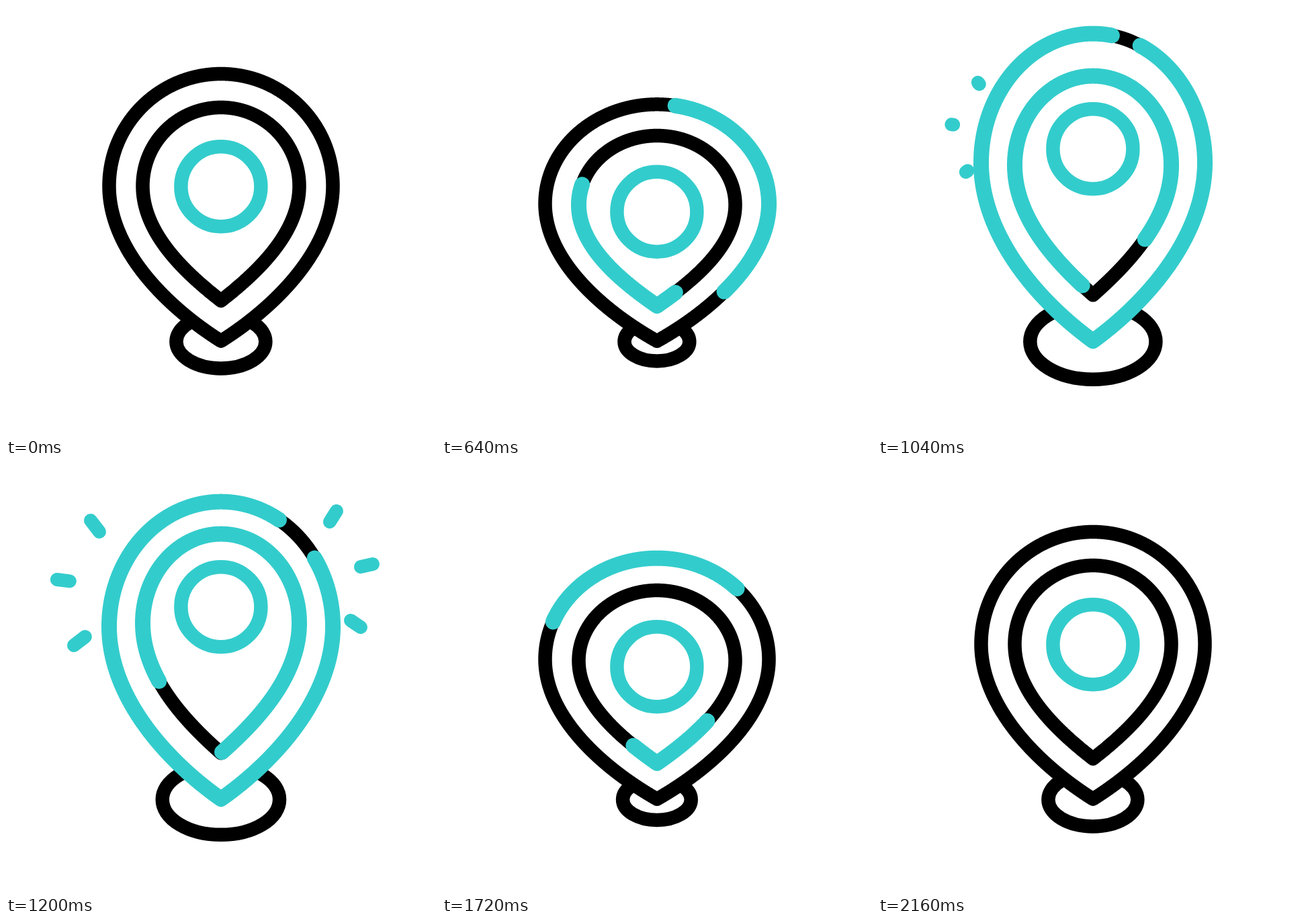
An HTML page with a canvas that plays this animation: 640 by 640 pixels, repeating every 2.64 s.

```html
<!DOCTYPE html>
<html>
<head>
<meta charset="utf-8">
<title>Map pin</title>
<style>
  html, body { margin: 0; width: 100%; height: 100%; overflow: hidden; background: #fff; }
  canvas { display: block; width: 100vmin; height: 100vmin; }
</style>
</head>
<body>
<canvas width="640" height="640"></canvas>
<script>
const ctx = document.querySelector('canvas').getContext('2d');
const LOOP = 2640, STEP = 40, SAMPLES = 2000;
const BLACK = '#000', TEAL = '#33cccc', LINE = 20.5, TRIM_LINE = 23;

// Eased progress from 0 to 1 between two times
function ease(t, from, to) {
  const u = Math.min(1, Math.max(0, (t - from) / (to - from)));
  return u * u * (3 - 2 * u);
}

// Rest, squash, stretch, squash, rest
function bounce(t, times, squash, stretch) {
  const values = [0, squash, -stretch, squash, 0];
  return values.slice(1).reduce(
    (sum, v, i) => sum + (v - values[i]) * ease(t, times[i], times[i + 1]), 0);
}

function samplePath(d) {
  const path = document.createElementNS('http://www.w3.org/2000/svg', 'path');
  path.setAttribute('d', d);
  const length = path.getTotalLength();
  return Array.from({ length: SAMPLES }, (_, i) => path.getPointAtLength(i / SAMPLES * length));
}

const outer = {
  points: samplePath('M320 101A166.5 167 0 0 1 486.5 268C486.5 360 405 445 320 498.7' +
    'C235 445 153.5 360 153.5 268A166.5 167 0 0 1 320 101Z'),
  top: 101, anchor: 499
};
const inner = {
  points: samplePath('M320 438.7C264 395 203.5 337 203.5 268A116.5 117 0 0 1 436.5 268' +
    'C436.5 337 376 395 320 438.7Z'),
  top: 151, anchor: 502
};

// Each ray: near x, near y, far x, far y, delay
const rays = [
  [150.8, 116.4, 124, 81.4, 0],
  [112.2, 176.7, 73, 171.6, 0],
  [133.4, 245.2, 98.4, 272, 0],
  [477.5, 93, 497, 62, 40],
  [520, 154.8, 555, 147, 40],
  [506.4, 228.5, 535.5, 248, 40]
];

function stroke(color, width) {
  ctx.strokeStyle = color;
  ctx.lineWidth = width;
  ctx.stroke();
}

function tracePin(pin, shift, from, to) {
  const scale = 1 - shift / (pin.anchor - pin.top);
  const first = Math.round(from * SAMPLES), last = Math.round(to * SAMPLES);
  ctx.beginPath();
  for (let i = first; i <= last; i++) {
    const p = pin.points[(i + SAMPLES) % SAMPLES];
    ctx.lineTo(p.x, pin.anchor + (p.y - pin.anchor) * scale);
  }
}

function drawPin(pin, shift, offset, start, end) {
  tracePin(pin, shift, 0, 1);
  ctx.closePath();
  ctx.fill();
  stroke(BLACK, LINE);
  if (end > start && start < 1) {
    tracePin(pin, shift, start + offset, end + offset);
    stroke(TEAL, TRIM_LINE);
  }
}

function drawEllipse(cy, rx, ry, color) {
  ctx.beginPath();
  ctx.ellipse(319.9, cy, rx, ry, 0, 0, 2 * Math.PI);
  stroke(color, LINE);
}

function drawRay([x1, y1, x2, y2, delay], t) {
  const head = ease(t - delay, 1000, 1240), tail = ease(t - delay, 1080, 1340);
  if (head <= tail) return;
  const at = f => [x1 + (x2 - x1) * f, y1 + (y2 - y1) * f];
  ctx.beginPath();
  ctx.moveTo(...at(tail));
  ctx.lineTo(...at(head));
  stroke(TEAL, 20);
}

function draw(t) {
  const body = [200, 600, 1080, 1560, 2160];
  const core = [240, 640, 1120, 1600, 2160];
  const dot = [200, 640, 1120, 1600, 2160];
  const drift = ease(t, 150, 1850);

  ctx.fillStyle = '#fff';
  ctx.fillRect(0, 0, 640, 640);
  ctx.lineCap = ctx.lineJoin = 'round';

  const rx = 66.5 - bounce(t, body, 19, 28);
  drawEllipse(499.5, rx, rx * 0.6, BLACK);
  drawPin(outer, bounce(t, body, 47.5, 62), 0.121 * drift,
    ease(t, 1030, 2110), ease(t, 300, 1140));
  drawPin(inner, bounce(t, core, 42, 54), -0.0705 + 0.13 * drift,
    ease(t, 935, 2020), ease(t, 200, 1290));
  drawEllipse(268.7 + bounce(t, dot, 37.5, 63.5), 59.5, 59.5, TEAL);
  rays.forEach(ray => drawRay(ray, t));
}

function tick() {
  const t = performance.now() % LOOP;
  draw(Math.floor(t / STEP) * STEP);
  requestAnimationFrame(tick);
}
tick();
</script>
</body>
</html>
```
